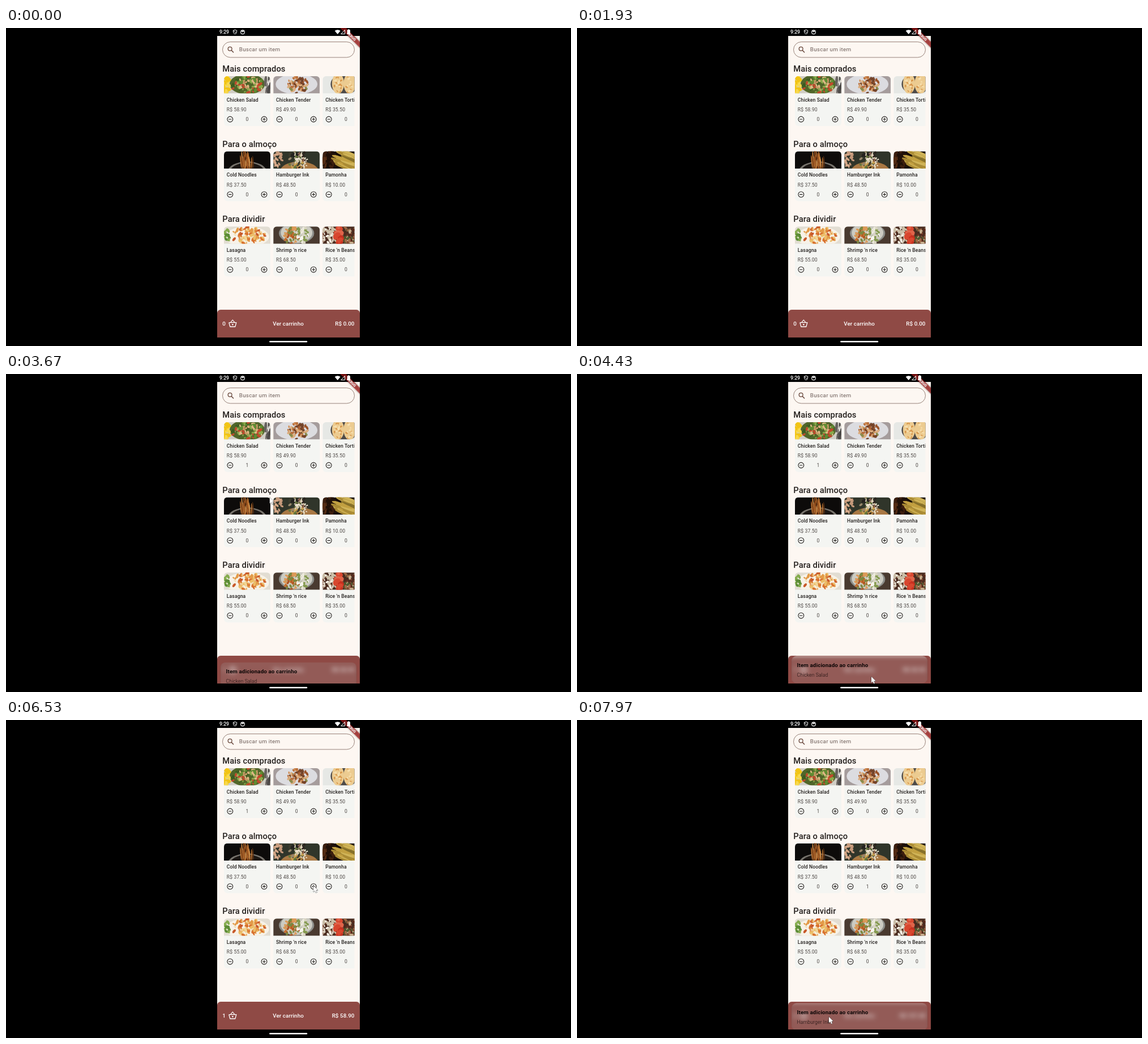
These frames come from a looping animation (998x561 px, 8000 ms). An HTML page with a canvas:

```html
<!DOCTYPE html>
<html lang="pt-BR">
<head>
<meta charset="utf-8">
<title>Cardápio</title>
<style>
html, body { margin: 0; width: 100%; height: 100%; overflow: hidden; background: #000; }
canvas { display: block; width: 100vw; height: 100vh; }
</style>
</head>
<body>
<canvas id="stage" width="998" height="561"></canvas>
<script>
const W = 998, H = 561, LOOP = 8000;
const LEFT = 373, RIGHT = 625, EDGE = 615.5, BAR_TOP = 497, NAV_TOP = 546;
const CARD_W = 82, PHOTO_H = 30.3, TOAST_H = 48;
const FONT = 'Roboto, "Noto Sans", sans-serif';
const CREAM = '#fdf7f2', CARD = '#f4f5f2', INK = '#231f1d', GREY = '#4b4542', MAROON = '#8f4a45';
const SMALL = 8.58, MEDIUM = 9.8, LARGE = 14.7;

const stage = document.getElementById('stage');
let ctx = stage.getContext('2d');

function makeLayer() {
  const c = document.createElement('canvas');
  c.width = W; c.height = H;
  return c;
}

function text(s, x, y, size, color, { weight = 400, align = 'left', spacing = 0 } = {}) {
  ctx.font = `${weight} ${size}px ${FONT}`;
  ctx.letterSpacing = spacing + 'px';
  ctx.textAlign = align;
  ctx.fillStyle = color;
  ctx.fillText(s, x, y);
}

function box(x, y, w, h, r, color) {
  ctx.beginPath();
  ctx.roundRect(x, y, w, h, r);
  ctx.fillStyle = color;
  ctx.fill();
}

function oval(x, y, rx, ry, color, angle = 0) {
  ctx.beginPath();
  ctx.ellipse(x, y, rx, ry, angle, 0, Math.PI * 2);
  ctx.fillStyle = color;
  ctx.fill();
}

function line(color, width, ...pts) {
  ctx.beginPath();
  for (let i = 0; i < pts.length; i += 2) ctx.lineTo(pts[i], pts[i + 1]);
  ctx.strokeStyle = color;
  ctx.lineWidth = width;
  ctx.stroke();
}

function ring(x, y, r, color, width) {
  ctx.beginPath();
  ctx.arc(x, y, r, 0, Math.PI * 2);
  ctx.strokeStyle = color;
  ctx.lineWidth = width;
  ctx.stroke();
}

function clipped(shape, draw) {
  ctx.save();
  ctx.beginPath();
  shape();
  ctx.clip();
  draw();
  ctx.restore();
}

function seeded(seed) {
  let s = seed * 7919 + 17;
  return () => (s = (s * 16807) % 2147483647) / 2147483647;
}

// A heap of seeded bits of food, x and reach as fractions of the picture width
const heap = (x, reach, colors, { size = 3.5, flat = 0.55, tilt } = {}) => rnd => {
  const palette = colors.split(' ');
  for (let i = 0; i < 280 * reach; i++) {
    const a = rnd() * Math.PI * 2, d = Math.sqrt(rnd()), k = size * (0.5 + rnd() * 0.8);
    oval(CARD_W * (x + Math.cos(a) * d * reach), PHOTO_H / 2 + Math.sin(a) * d * 15, k, k * flat,
      palette[Math.floor(rnd() * palette.length)], tilt === undefined ? rnd() * 3 : tilt + rnd() * 0.2);
  }
};

const plate = (x, reach, color, y = 14) => () => oval(CARD_W * x, y, CARD_W * reach, 18, color);

// Each picture: background colour, then its layers
const pictures = {
  salad: ['#d0cdc5', plate(0.5, 0.38, '#51662a'),
    heap(0.03, 0.08, '#f2c414 #f7d84c', { size: 6 }),
    heap(0.5, 0.34, '#5f8c32 #8aa94c #3c5c20 #c99a68 #e0b987 #c2492c'),
    heap(0.94, 0.06, '#4c4947 #66615e #dddad6', { size: 8, flat: 0.25, tilt: 1.5 })],
  tender: ['#a59c9c', plate(0.5, 0.45, '#dcdce0'),
    heap(0.52, 0.22, '#b8703f #9a5228 #d08c52 #dcae80 #74442a #8a8c4c')],
  tortilla: ['#e6e8e5', plate(0.47, 0.3, '#4d4a48'),
    ...[0.33, 0.58].flatMap(x => [
      plate(x, 0.13, '#eccb90', 13),
      heap(x, 0.08, '#f7e0b0 #efcf94 #d99a50', { size: 2.5 })])],
  noodles: ['#0d0b0a', plate(0.5, 0.42, '#77736c', 36), plate(0.5, 0.38, '#1b1613', 38),
    heap(0.5, 0.14, '#b87030 #8f4a1a #d89850 #5c3012', { size: 11, flat: 0.09, tilt: 1.45 })],
  burger: ['#30352a', plate(0.56, 0.42, '#a87844', 36),
    heap(0.1, 0.09, '#c4987a #d5a888'),
    heap(0.48, 0.18, '#25221f #3a3a2c #d8d0b8 #66783c #97866a #c8a050'),
    heap(0.62, 0.13, '#ddd0b4 #8a5c4c #2b211c #efe6d4', { size: 2.6 })],
  corn: ['#170c06',
    heap(0.15, 0.16, '#3c1e0e #1f1008 #542c14', { size: 5 }),
    heap(0.52, 0.14, '#a98a34 #c2a040 #86702a #d0b458', { size: 18, flat: 0.16, tilt: 0.3 })],
  lasagna: ['#e2ddd2', plate(0.5, 0.47, '#f7f2e8', 18),
    heap(0.06, 0.07, '#5c8c36 #86ac4e'),
    heap(0.53, 0.36, '#d9722f #ecbd68 #f1d596 #c8592a #e39a48 #f3e3c0')],
  shrimp: ['#493a30', plate(0.5, 0.38, '#8d8e8a', 12), plate(0.5, 0.34, '#cccbc2', 11),
    heap(0.4, 0.17, '#c8702f #ac5222 #dc9a58 #7c8840'),
    heap(0.64, 0.14, '#ece9dc #d8d4c2 #f8f6ee #84994e')],
  beans: ['#4a2c20',
    heap(0.14, 0.2, '#e4dccc #cbbfa8 #f4efe4 #7c4a34'),
    heap(0.56, 0.2, '#5b2a1c #7c4630 #a06a48 #4c5c30 #c9b190'),
    heap(0.34, 0.07, '#c9301f #d8472f #e0644a', { size: 5, flat: 0.8 })]
};

const sections = [
  ['Mais comprados', ['Chicken Salad', 58.9, 'salad'], ['Chicken Tender', 49.9, 'tender'], ['Chicken Tortilla', 35.5, 'tortilla']],
  ['Para o almoço', ['Cold Noodles', 37.5, 'noodles'], ['Hamburger Ink', 48.5, 'burger'], ['Pamonha', 10, 'corn']],
  ['Para dividir', ['Lasagna', 55, 'lasagna'], ["Shrimp 'n rice", 68.5, 'shrimp'], ["Rice 'n Beans", 35, 'beans']]
];
const cardX = c => 385 + c * 87.2;
const rowY = r => 85 + r * 132.6;
const money = n => 'R$ ' + n.toFixed(2);

function drawPicture(name, x, y) {
  const [bg, ...layers] = pictures[name], rnd = seeded(name.length + name.charCodeAt(0));
  clipped(() => ctx.roundRect(x, y, CARD_W, PHOTO_H, [6, 6, 0, 0]), () => {
    ctx.translate(x, y);
    ctx.fillStyle = bg;
    ctx.fillRect(0, 0, CARD_W, PHOTO_H + 1);
    for (const layer of layers) layer(rnd);
  });
}

function roundButton(x, y, plus) {
  ring(x, y, 4.9, INK, 1.1);
  line(INK, 1.1, x - 2.7, y, x + 2.7, y);
  if (plus) line(INK, 1.1, x, y - 2.7, x, y + 2.7);
}

function drawCard(x, y, [name, price, picture]) {
  box(x, y, CARD_W, 88, 6, CARD);
  drawPicture(picture, x, y);
  text(name, x + 4.8, y + 44.8, SMALL, INK, { weight: 500, spacing: 0.12 });
  text(money(price), x + 4.8, y + 62, SMALL, GREY, { spacing: 0.15 });
  roundButton(x + 10.8, y + 76, false);
  roundButton(x + 71, y + 76, true);
}

function drawSearch() {
  ctx.beginPath();
  ctx.roundRect(382.5, 24.5, 233, 27.4, 13.7);
  ctx.strokeStyle = '#8c756c';
  ctx.lineWidth = 0.9;
  ctx.stroke();
  ring(395.6, 36.8, 3.4, '#66453a', 1.3);
  line('#66453a', 1.5, 398.1, 39.3, 402, 43.2);
  text('Buscar um item', 411.8, 41.4, MEDIUM, '#6b5c57', { spacing: 0.28 });
}

function drawBanner() {
  clipped(() => ctx.rect(LEFT, 0, RIGHT - LEFT, 60), () => {
    ctx.translate(RIGHT, 0);
    ctx.rotate(Math.PI / 4);
    ctx.filter = 'blur(1.8px)';
    box(-26, 17.2, 52, 7.4, 0, 'rgba(0,0,0,.5)');
    ctx.filter = 'none';
    box(-26, 17.2, 52, 7.4, 0, 'rgba(183,28,28,.63)');
    text('DEBUG', 0, 23.1, 6.2, '#fff', { weight: 900, align: 'center' });
  });
}

function drawStatus() {
  const white = '#fff';
  text('9:29', 377, 10.4, 8.6, white, { weight: 500 });
  line(white, 1, 404.5, 3.2, 407.8, 4.5, 407, 8.6, 404.5, 10.8, 402, 8.6, 401.2, 4.5, 404.5, 3.2);
  line(white, 0.9, 402, 4.6, 407, 9.4);
  ring(418, 7.2, 3.4, white, 1.1);
  box(415.6, 4.4, 4.8, 2.3, 1, white);
  ctx.beginPath();
  ctx.moveTo(585.7, 11);
  ctx.arc(585.7, 11, 7.8, Math.PI * 1.28, Math.PI * 1.72);
  ctx.fill();
  line(white, 1, 598.6, 3.4, 598.6, 10.6, 591.6, 10.6, 598.6, 3.4);
  box(602.6, 3.2, 5.4, 8, 1, white);
  box(604.1, 2.2, 2.4, 1.5, 0.3, white);
}

function drawBasket() {
  line('#fff', 1.3, 393.8, 519.6, 406.8, 519.6, 404.8, 527, 395.8, 527, 393.8, 519.6);
  line('#fff', 1.2, 396.8, 519.4, 400.3, 515, 403.8, 519.4);
  oval(400.3, 523.2, 1.3, 1.3, '#fff');
}

// Everything that never changes
function renderBase() {
  const layer = makeLayer(), main = ctx;
  ctx = layer.getContext('2d');
  ctx.lineJoin = 'round';
  box(0, 0, W, H, 0, '#000');
  box(LEFT, 14, RIGHT - LEFT, H - 14, 0, CREAM);
  drawSearch();
  sections.forEach(([title, ...cards], r) => {
    text(title, 382.3, rowY(r) - 7.9, LARGE, INK, { weight: 500, spacing: 0.08 });
    clipped(() => ctx.rect(382, rowY(r) - 1, EDGE - 382, 92),
      () => cards.forEach((card, c) => drawCard(cardX(c), rowY(r), card)));
  });
  box(LEFT, BAR_TOP, RIGHT - LEFT, H - BAR_TOP, [6, 6, 0, 0], MAROON);
  text('Ver carrinho', 471.2, 524.7, MEDIUM, '#fff', { weight: 500, spacing: 0.09 });
  drawBasket();
  drawBanner();
  drawStatus();
  ctx = main;
  return layer;
}

// Each order: card tapped, then its toast is grabbed and dragged down with the pointer
const orders = [
  { row: 0, col: 0, tap: 3280, grab: 4450, end: 4850 },
  { row: 1, col: 1, tap: 6840, grab: 7920, end: LOOP }
];
const plusAt = ({ row, col }) => [cardX(col) + 71, rowY(row) + 75];

// Time and place of each stop of the pointer
const stops = [
  [2960, 364, 214],
  [3200, ...plusAt(orders[0])], [3420, ...plusAt(orders[0])],
  [4430, 520, 534], [4850, 530, 588],
  [5180, 568, 588], [5470, 574, 536],
  [6260, ...plusAt(orders[1])], [6840, ...plusAt(orders[1])],
  [7230, 436, 447], [LOOP, 445, 524]
];
const smooth = u => u * u * (3 - 2 * u);
const clamp = u => Math.max(0, Math.min(1, u));

function pointerAt(t) {
  const i = stops.findIndex(s => s[0] >= t);
  if (i < 1) return null;
  const [t0, x0, y0] = stops[i - 1], [t1, x1, y1] = stops[i];
  const u = smooth((t - t0) / (t1 - t0));
  return { x: x0 + (x1 - x0) * u, y: y0 + (y1 - y0) * u };
}

function drawPointer({ x, y }) {
  clipped(() => ctx.rect(LEFT, 0, RIGHT - LEFT, H), () => {
    ctx.translate(x, y);
    line('#2b2b2b', 0.9, 0, 0, 0, 10.6, 2.5, 8.4, 4.2, 12.3, 6, 11.5, 4.4, 7.7, 7.6, 7.5, 0, 0);
    ctx.fillStyle = '#fff';
    ctx.fill();
  });
}

// Distance of a toast below its resting place
function toastOffset({ tap, grab }, t) {
  const left = 1 - clamp((t - tap - 20) / 1000);
  const rise = 50 * (1 - Math.sqrt(1 - left ** 2));
  return rise + (t > grab ? pointerAt(t).y - pointerAt(grab).y : 0);
}

const copy = makeLayer();
function drawToast(name, dy) {
  const x = 378.8, y = 497.5 + dy, w = 240.4;
  copy.getContext('2d').drawImage(stage, 0, 0);
  clipped(() => ctx.roundRect(x, y, w, TOAST_H, 9), () => {
    ctx.filter = 'blur(4.3px)';
    ctx.drawImage(copy, 0, 0);
    ctx.filter = 'none';
    box(x, y, w, TOAST_H, 0, 'rgba(158,158,158,.2)');
  });
  text('Item adicionado ao carrinho', x + 9.8, y + 19.1, MEDIUM, '#0c0606', { weight: 700, spacing: 0.1 });
  text(name, x + 9.8, y + 36, SMALL, '#160b0a', { weight: 300, spacing: 0.15 });
}

function drawCounts(placed) {
  for (let row = 0; row < 3; row++) for (let col = 0; col < 3; col++) {
    const n = placed.filter(o => o.row === row && o.col === col).length;
    text(n, cardX(col) + 41, rowY(row) + 79.1, SMALL, GREY, { align: 'center' });
  }
  const total = placed.reduce((sum, { row, col }) => sum + sections[row][col + 1][1], 0);
  const style = { weight: 500, spacing: 0.09 };
  text(placed.length, 382.2, 524.7, MEDIUM, '#fff', style);
  text(money(total), EDGE, 524.7, MEDIUM, '#fff', { ...style, align: 'right' });
}

function drawNav() {
  box(LEFT - 1, NAV_TOP, RIGHT - LEFT + 2, H - NAV_TOP, 0, '#000');
  box(465.2, 552, 67, 2.6, 1.3, '#fff');
}

const base = renderBase();
const start = performance.now();

function frame() {
  const t = Math.max(0, performance.now() - start) % LOOP;
  const placed = orders.filter(o => t >= o.tap);
  ctx.drawImage(base, 0, 0);
  drawCounts(placed);
  const last = placed.at(-1);
  if (last && t < last.end) drawToast(sections[last.row][last.col + 1][0], toastOffset(last, t));
  drawNav();
  const p = pointerAt(t);
  if (p) drawPointer(p);
  requestAnimationFrame(frame);
}
requestAnimationFrame(frame);
</script>
</body>
</html>
```
